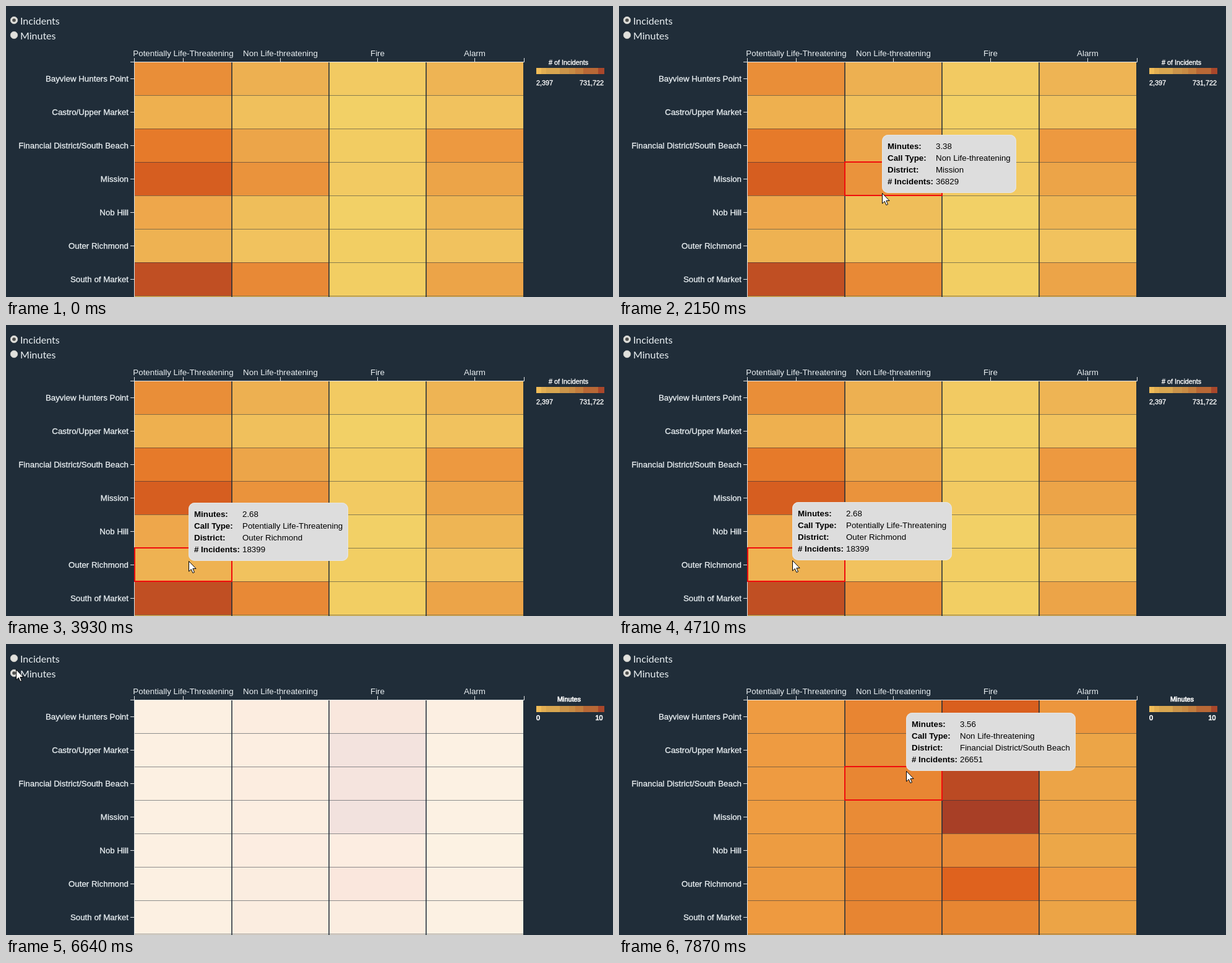
Animation, 981 px wide and 470 px high, one loop 8000 ms. Source, as an HTML page:

```html
<!DOCTYPE html>
<html lang="en">
<head>
<meta charset="utf-8">
<title>Incident heatmap</title>
<style>
  html, body { margin: 0; width: 100%; height: 100%; overflow: hidden; background: #202d39; }
  body { position: relative; font: 13.333px "Liberation Sans", Arial, sans-serif; }
  svg { position: absolute; left: 0; top: 0; }
  text { fill: #eaf0f3; }
  .row { text-anchor: end; stroke: #eaf0f3; stroke-width: .3px; }
  .col { text-anchor: middle; }
  .radio { font: 16px Lato, sans-serif; }
  .legend text { font-size: 10.8px; fill: #fff; stroke: #fff; stroke-width: .35px; }
  .axis { fill: none; stroke: #e4e6e7; }
  .gap { stroke: #202d39; }
  #tip {
    position: absolute; box-sizing: border-box; width: max-content; height: 94px; padding: 9px;
    display: grid; grid-template-columns: 78px auto; grid-auto-rows: 19px; line-height: 19px;
    white-space: nowrap; color: #000; background: #ddd; border-radius: 10px;
    box-shadow: inset 0 0 0 1px #e6e6e6;
  }
</style>
</head>
<body>
<svg id="chart" width="981" height="470"></svg>
<div id="tip"></div>
<svg id="pointer" width="981" height="470">
  <path id="arrow" d="M0 0V16.5L3.8 13L6.4 19L9 17.9L6.4 12H11.6Z" fill="#fff" stroke="#000" stroke-width="1"/>
  <path id="beam" d="M-3 -7.5H-1L0 -6.5L1 -7.5H3M0 -6.5V6.5M-3 7.5H-1L0 6.5L1 7.5H3" fill="none" stroke="#d5d9dc"/>
</svg>
<script>
const LOOP = 8000, LEFT = 208, TOP = 90, CELL_W = 157, CELL_H = 54;
const columns = ['Potentially Life-Threatening', 'Non Life-threatening', 'Fire', 'Alarm'];
const rows = ['Bayview Hunters Point', 'Castro/Upper Market', 'Financial District/South Beach',
  'Mission', 'Nob Hill', 'Outer Richmond', 'South of Market'];

const table = text => text.trim().split('\n').map(line => line.trim().split(' '));
const incidentColors = table(`
  e98e38 edb051 f2ca62 eeb454
  eeb04f f0c05c f2d066 f1c25e
  e67a2a eca549 f2cc62 ed9940
  d65e20 ea933c f2ca62 eca448
  eea74b efbe5a f2d066 eeb554
  eeb252 f1c25e f2ce63 f1c25e
  c04f23 e88936 f2ce63 eca448
  eeb24f f0bd58 f2cc62 f0bd58`);
const minuteColors = table(`
  ee9b41 e88532 d95f1e ec963d
  ee9b41 e88c37 ad4326 eca547
  ee9b41 e88633 bb4a23 eca447
  ee9c41 e98b36 a83f26 eca246
  ed9c41 e88936 e88936 eca748
  ed9a40 e78430 df621e ee9c42
  ee9a40 e78532 e78632 eca446
  eca748 eca246 ee9c41 efb04f`);
const counts = table(`
  39872 20518 5214 17926
  19264 11873 2397 10984
  51658 26651 4386 34172
  65317 36829 5198 27043
  23941 12746 2615 17382
  18399 10927 3104 11046
  72164 42375 3582 27318`);
const minutes = table(`
  2.72 3.61 6.18 2.94
  2.69 3.32 8.97 2.31
  2.67 3.56 8.41 2.36
  2.65 3.38 9.19 2.43
  2.64 3.42 3.47 2.24
  2.68 3.64 5.87 2.63
  2.70 3.58 3.55 2.37`);

// Each move advances the pointer along its path in equal, held steps.
const moves = [
  { from: 370, to: 370, steps: 1, path: [[110, 440]], anchor: [382, 399], cell: [6, 0] },
  { from: 440, to: 440, steps: 1, path: null },
  { from: 670, to: 1060, steps: 6, path: [[58, 304], [190, 265], [330, 235], [484, 212], [420, 177], [350, 184]] },
  { from: 1520, to: 1750, steps: 4, path: [[352, 209], [350, 240], [358, 265], [405, 294]] },
  { from: 2150, to: 2450, steps: 5, path: [[425, 302], [505, 322], [582, 322]] },
  { from: 3000, to: 3310, steps: 5, path: [[618, 287], [682, 243]] },
  { from: 3690, to: 4090, steps: 6, path: [[600, 262], [480, 310], [370, 360], [295, 381], [283, 385], [285, 386]] },
  { from: 4640, to: 5400, steps: 11, path: [[280, 380], [230, 250], [150, 130], [40, 41]] },
  { from: 5480, to: 5940, steps: 7, path: [[23, 41], [19, 43], [17, 41], [16, 41]] },
  { from: 7410, to: 7870, steps: 7, path: [[45, 62], [205, 205], [350, 275], [464, 205]] }
];
const PRESS = 6110, SELECT = 6340, RECOLOR = 6490, FADE_START = 6372, FADE_LENGTH = 800;

const chart = document.getElementById('chart');
const tip = document.getElementById('tip');
const arrow = document.getElementById('arrow');
const beam = document.getElementById('beam');

function add(tag, attrs, parent = chart, text = '') {
  const node = document.createElementNS('http://www.w3.org/2000/svg', tag);
  for (const key in attrs) node.setAttribute(key, attrs[key]);
  node.textContent = text;
  return parent.appendChild(node);
}
const label = (text, x, y, cls, parent) => add('text', { x, y, class: cls }, parent, text);
const show = (node, on) => { node.style.display = on ? '' : 'none'; };

const cells = incidentColors.map((line, r) => line.map((_, c) => add('rect',
  { x: LEFT + c * CELL_W, y: TOP + r * CELL_H, width: CELL_W, height: CELL_H })));
for (let r = 1; r <= 7; r++)
  add('path', { d: `M208 ${TOP + r * CELL_H + .5}h628`, class: 'gap', 'stroke-opacity': .5 });
for (let c = 1; c <= 3; c++)
  add('path', { d: `M${LEFT + c * CELL_W} 91V470`, class: 'gap', 'stroke-width': 1.7, 'stroke-opacity': .9 });

add('path', { d: 'M207.5 84V90.5H837.5V84M201 90.5H207.5V470', class: 'axis' });
columns.forEach((name, c) => {
  const x = 286.5 + c * CELL_W;
  add('path', { d: `M${x} 84V90`, class: 'axis' });
  label(name, x, 81, 'col');
});
rows.forEach((name, r) => {
  const y = 117.5 + r * CELL_H;
  add('path', { d: `M201 ${y}H207`, class: 'axis' });
  label(name, 198, y + 4.5, 'row');
});
const outline = add('rect', { width: CELL_W, height: CELL_H, fill: 'none', stroke: '#f00c0c', 'stroke-width': 2 });

const radios = ['Incidents', 'Minutes'].map((name, i) => {
  const cy = 23 + 24 * i;
  label(name, 23, cy + 7, 'radio');
  return {
    disc: add('circle', { cx: 13, cy, r: 5.7, stroke: '#c4c4c0' }),
    dot: add('circle', { cx: 13, cy, r: 2.8, fill: '#50504e' })
  };
});

let stopX = 857;
[[8, 'f0bc58'], [8, 'e2ae52'], [22, 'd8a650'], [15, 'ca944a'], [10, 'c78b45'],
 [13, 'c27d3e'], [24, 'b86836'], [10, 'a9472b']].forEach(([width, color]) => {
  add('rect', { x: stopX, y: 100, width, height: 10, fill: '#' + color });
  stopX += width;
});
const legends = [
  [['# of Incidents', 877, 95], ['2,397', 857, 128], ['731,722', 927, 128]],
  [['Minutes', 891, 93], ['0', 857, 123], ['10', 952.5, 123]]
].map((items, i) => {
  const group = add('g', { class: 'legend' });
  items.forEach(([text, x, y]) => {
    label(text, x, y, '', group).style.strokeWidth = i ? '.7px' : '.35px';
  });
  return group;
});

function pointAt(path, u) {
  const s = u * (path.length - 1), i = Math.min(Math.floor(s), path.length - 2);
  if (path.length < 2) return path[0];
  return [0, 1].map(k => Math.round(path[i][k] + (path[i + 1][k] - path[i][k]) * (s - i)));
}

function pointerAt(t) {
  const move = moves.filter(m => t >= m.from).pop();
  if (!move || !move.path) return null;
  const span = move.to - move.from, last = move.steps - 1;
  const step = last ? Math.min(last, Math.floor((t - move.from) / span * last + .01)) : 0;
  const [x, y] = pointAt(move.path, last ? step / last : 0);
  return { x, y, anchor: move.anchor || [x, y], cell: move.cell || hit(x, y) };
}

function hit(x, y) {
  const c = Math.floor((x - LEFT) / CELL_W), r = Math.floor((y - TOP) / CELL_H);
  return rows[r] && columns[c] ? [r, c] : null;
}

function fadeAt(t) {
  if (t >= 7260) return 1;
  const held = t < 6640 ? RECOLOR : 6640 + 78 * Math.min(5, Math.floor((t - 6640) / 78));
  const u = (held - FADE_START) / FADE_LENGTH;
  return u < .5 ? 4 * u ** 3 : 1 - 4 * (1 - u) ** 3;
}

function fromWhite(hex, k) {
  const mixed = [0, 2, 4].map(i => Math.round(255 + (parseInt(hex.substr(i, 2), 16) - 255) * k));
  return `rgb(${mixed})`;
}

function drawTip({ anchor, cell: [r, c] }) {
  tip.style.left = anchor[0] + 'px';
  tip.style.top = anchor[1] - 94 + 'px';
  const html = [['Minutes:', minutes[r][c]], ['Call Type:', columns[c]],
    ['District:', rows[r]], ['# Incidents:', counts[r][c]]]
    .map(([key, value]) => `<b>${key}</b><span>${value}</span>`).join('');
  if (tip.dataset.cell !== `${r},${c}`) {
    tip.innerHTML = html;
    tip.dataset.cell = `${r},${c}`;
  }
  outline.setAttribute('x', LEFT + c * CELL_W);
  outline.setAttribute('y', TOP + r * CELL_H);
}

function render(t) {
  const recolored = t >= RECOLOR, fade = recolored ? fadeAt(t) : 1;
  const colors = recolored ? minuteColors : incidentColors;
  cells.forEach((line, r) => line.forEach((cell, c) =>
    cell.setAttribute('fill', fromWhite(colors[r][c], fade))));
  legends.forEach((group, i) => show(group, i === +recolored));

  const chosen = +(t >= SELECT);
  radios.forEach(({ disc, dot }, i) => {
    show(dot, i === chosen);
    const pressed = i === 1 && t >= PRESS && t < SELECT;
    disc.setAttribute('fill', pressed ? '#bdbdba' : '#e1e1dd');
  });

  const pointer = pointerAt(t);
  const active = pointer && pointer.cell;
  show(tip, active);
  show(outline, active);
  if (active) drawTip(pointer);
  const overText = pointer && pointer.x > 20 && pointer.x < 30 && pointer.y < 60;
  show(arrow, pointer && !overText);
  show(beam, overText);
  if (pointer) {
    arrow.setAttribute('transform', `translate(${pointer.x + .5} ${pointer.y + .5})`);
    beam.setAttribute('transform', `translate(${pointer.x + .5} ${pointer.y})`);
  }
}

const start = performance.now();
function tick() {
  render((performance.now() - start) % LOOP);
  requestAnimationFrame(tick);
}
tick();
</script>
</body>
</html>
```
